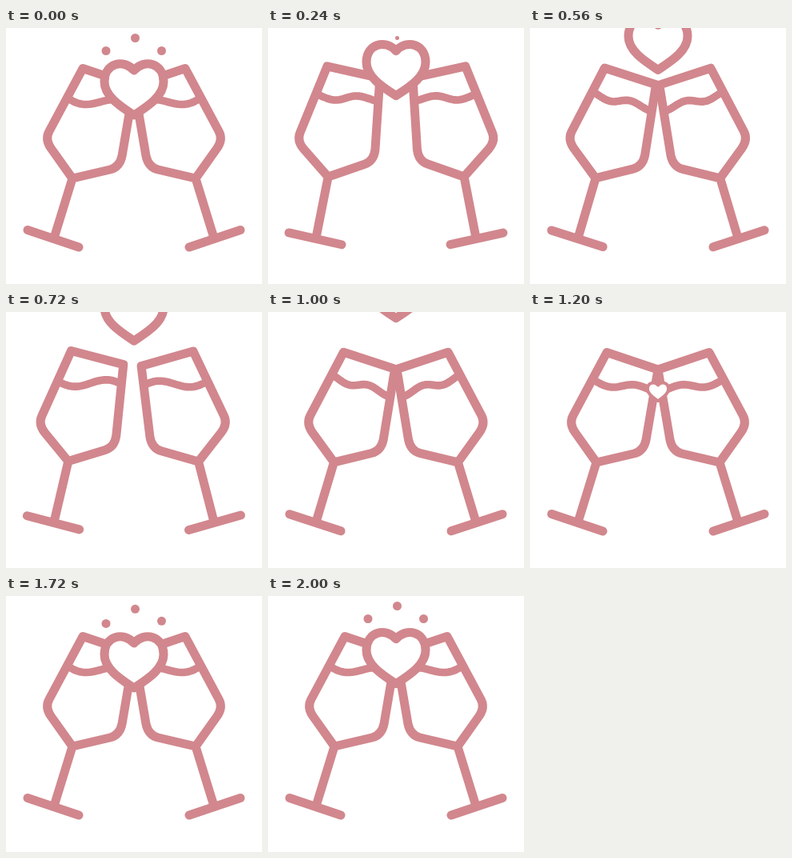
An HTML page that plays this animation: 320x320 px, repeating every 2040 ms.

```html
<!DOCTYPE html>
<html lang="en">
<head>
<meta charset="utf-8">
<title>Clinking glasses</title>
<style>
  html, body { margin: 0; height: 100%; overflow: hidden; background: #fff; }
  svg { display: block; width: 100%; height: 100%; }
  path { fill: none; stroke: #d1878d; stroke-width: 11; stroke-linecap: round; stroke-linejoin: round; }
  circle { fill: #d1878d; }
  #heart { fill: #fff; }
  .wine { stroke-width: 9.6; stroke-linecap: butt; }
</style>
</head>
<body>
<svg viewBox="0 0 320 320">
  <defs>
    <g id="glass">
      <path class="wine"/>
      <path d="M96 50.5 L54 129 Q48.5 139 56 150 L83 188 L130 177 Q142 174 145 160 L160 72 Z
               M83 188 L60.500 261 M27 252.500 L91 274"/>
    </g>
  </defs>
  <circle cx="125"/><circle cx="161.5"/><circle cx="194.5"/>
  <use id="left" href="#glass"/>
  <use id="right" href="#glass"/>
  <path id="heart" d="M160 109 C145 99 123 86 123 67 C123 44 147 38 160 53
                      C173 38 197 44 197 67 C197 86 175 99 160 109 Z"/>
</svg>
<script>
const LOOP = 2040, STEP = 40;
const POP = 1160, FLOAT = LOOP - POP;   // heart appears; its age when it floats off
const find = s => document.querySelector(s);
const left = find('#left'), right = find('#right'), heart = find('#heart'), wine = find('.wine');
const dots = document.querySelectorAll('circle');

const clamp = x => Math.min(1, Math.max(0, x));
const ease = x => (x = clamp(x), x * x * (3 - 2 * x));
const bump = x => Math.sin(Math.PI * clamp(x)) ** 2;
const wave = (x, crest, length) => Math.cos(2 * Math.PI * (x - crest) / length);

// Two swings apart, meeting again after each
const swing = (t, first, second) => first * bump(t / 480) + second * bump((t - 480) / 580);

// Alternates between 1 (long wave) and 0 (short ripple)
const turns = [0, 500, 740, 1020, 1320];
const slosh = t => turns.slice(1).reduce((s, end, i) =>
  s + (i % 2 ? 1 : -1) * ease((t - turns[i]) / (end - turns[i])), 1);

function surface(s) {
  let d = '';
  for (let x = 79; x <= 154; x += 2.5) {
    const y = 81 + .306 * (x - 80) + 10 * s * wave(x, 90, 110) + 3.5 * (1 - s) * wave(x, 102, 50);
    d += `${d ? 'L' : 'M'}${x} ${y}`;
  }
  return d;
}

function drawDot(dot, age, start, end) {
  const p = clamp((age - start) / (FLOAT - start));
  dot.setAttribute('cy', end + (76 - end) * (1 - p) ** 3);
  dot.setAttribute('r', 5.5 * clamp((age - start) / 120) * clamp(1 - (age - FLOAT) / 440));
}

function draw(t) {
  const age = (t - POP + LOOP) % LOOP;
  left.setAttribute('transform', `rotate(${-swing(t, 5.9, 4.2)} 60 263)`);
  right.setAttribute('transform',
    `translate(320) scale(-1 1) rotate(${-swing(t, 6.1, 2.9)} 60 263)`);
  wine.setAttribute('d', surface(slosh(t)));

  // Slow drift, then a steady float upwards
  const steps = (age - FLOAT) / STEP;
  const rise = steps * (steps < 0 ? .75 : 4.05);
  heart.setAttribute('transform',
    `translate(160 ${88 - rise}) scale(${ease((age + STEP) / 200)}) translate(-160 -88)`);

  drawDot(dots[0], age, 240, 28.5);
  drawDot(dots[1], age, 60, 12.5);
  drawDot(dots[2], age, 60, 28.5);
}

const begin = performance.now();
function frame() {
  const t = Math.max(0, performance.now() - begin) % LOOP;
  draw(Math.floor(t / STEP) * STEP);
  requestAnimationFrame(frame);
}
frame();
</script>
</body>
</html>
```
